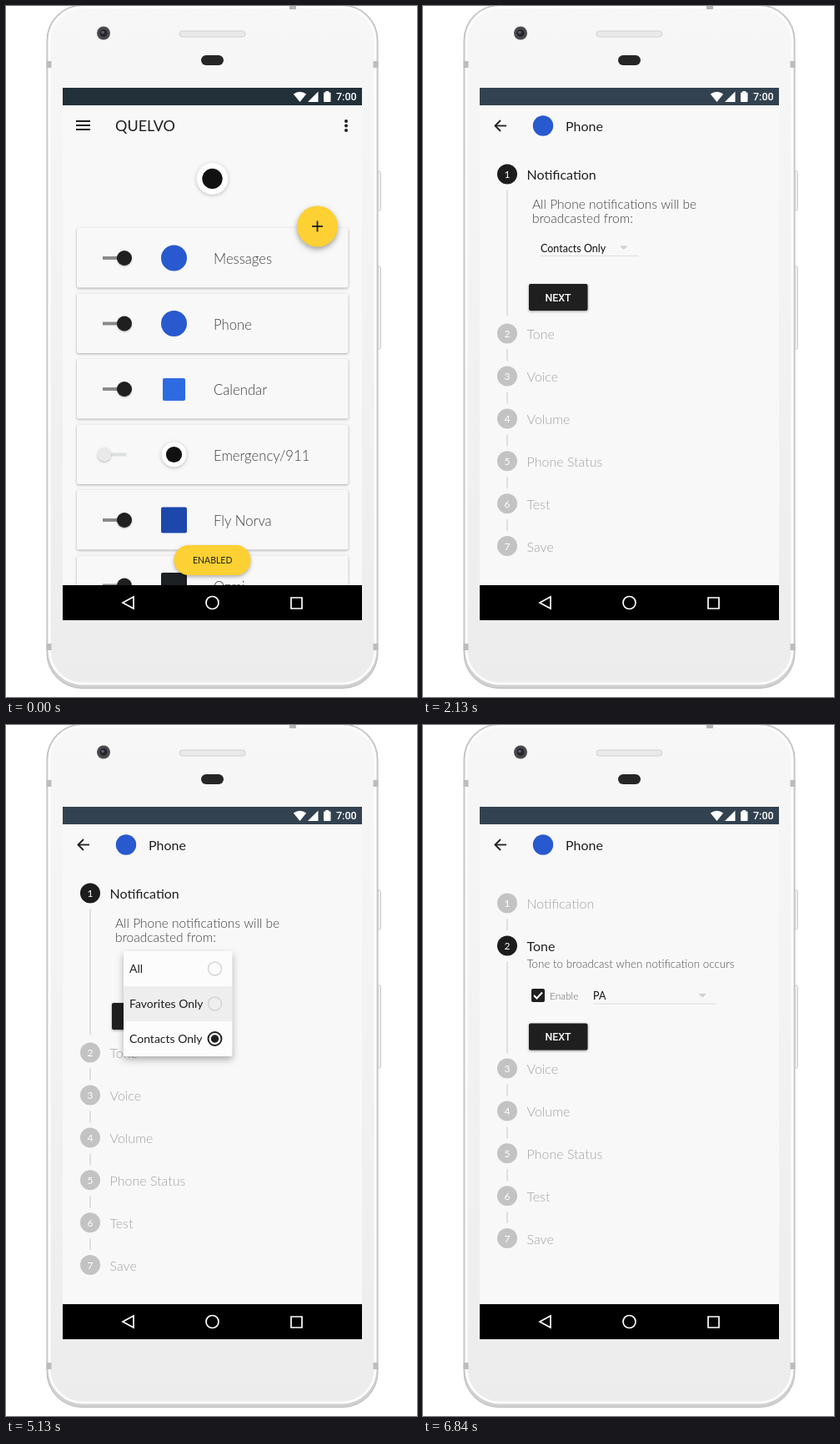
Animation, 493 px wide and 828 px high, one loop 8000 ms. Source, as an HTML page with a canvas:

```html
<!DOCTYPE html>
<html lang="en">
<head>
<meta charset="utf-8">
<title>App notification setup</title>
<style>
  html, body { margin: 0; width: 100%; height: 100%; overflow: hidden; background: #fff; }
  canvas { display: block; width: 493px; height: 828px; }
</style>
</head>
<body>
<canvas id="stage"></canvas>
<script>
const LOOP = 8000, INK = '#1f1f1f', BLUE = '#2859ce', YELLOW = '#fdd033', PAPER = '#f8f8f8';
const SOFT = '#404040', FAINT = '#a2a2a2';
const LATO = 'Lato, "Open Sans", sans-serif', ROBOTO = 'Roboto, sans-serif';
const canvas = document.getElementById('stage');
const ctx = canvas.getContext('2d');
const ratio = window.devicePixelRatio || 1;
canvas.width = 493 * ratio;
canvas.height = 828 * ratio;

const clamp = v => Math.max(0, Math.min(1, v));
const progress = (t, start, length) => clamp((t - start) / length);
const mix = (a, b, k) => a + (b - a) * k;
const easeOut = (k, power) => 1 - (1 - k) ** power;
const easeInOut = k => k * k * (3 - 2 * k);

function paint(fill, stroke, width = 1) {
  if (fill) { ctx.fillStyle = fill; ctx.fill(); }
  if (stroke) { ctx.strokeStyle = stroke; ctx.lineWidth = width; ctx.stroke(); }
}
function box(x, y, w, h, r, fill, stroke, width) {
  ctx.beginPath();
  ctx.roundRect(x, y, w, h, r);
  paint(fill, stroke, width);
}
function disc(x, y, r, fill, stroke, width) {
  ctx.beginPath();
  ctx.arc(x, y, r, 0, Math.PI * 2);
  paint(fill, stroke, width);
}
function path(points, fill, stroke, width, closed = !!fill) {
  ctx.beginPath();
  points.forEach(([x, y]) => ctx.lineTo(x, y));
  if (closed) ctx.closePath();
  paint(fill, stroke, width);
}
const line = (x1, y1, x2, y2, color, width) => path([[x1, y1], [x2, y2]], null, color, width);
function text(string, x, y, size, color, weight = 300, align = 'left', family = LATO) {
  ctx.font = `${weight} ${size}px ${family}`;
  ctx.textAlign = align;
  ctx.fillStyle = color;
  ctx.fillText(string, x, y);
}
function group(draw, alpha = 1) {
  ctx.save();
  ctx.globalAlpha *= alpha;
  draw();
  ctx.restore();
}
function clipBox(x, y, w, h) {
  ctx.beginPath();
  ctx.rect(x, y, w, h);
  ctx.clip();
}
function shadowed(blur, dy, strength, draw) {
  group(() => {
    ctx.shadowColor = `rgba(0,0,0,${strength})`;
    ctx.shadowBlur = blur * ratio;
    ctx.shadowOffsetY = dy * ratio;
    draw();
  });
}

function drawPhone() {
  for (const [y, h] of [[198, 47], [312, 99]]) box(444, y, 5.5, h, 1.5, '#efefef', '#cfcfcf');
  box(49, -1, 397, 818.5, 42, '#d0d0d0', '#bcbcbc', 1);
  const shell = ctx.createLinearGradient(0, 0, 0, 828);
  shell.addColorStop(0, '#f7f7f7');
  shell.addColorStop(1, '#ececec');
  box(52, 1.5, 391, 810.5, 40, shell, '#fdfdfd', 3);
  for (const y of [66, 764]) {
    for (const x of [48.5, 440.5]) box(x, y, 6, 8, 0, '#bdbdbd');
  }
  box(340, 0, 8, 4, 0, '#b5b5b5');
  box(208, 30, 79, 7, 3.5, '#e9e9e9', '#d0d0d0');
  disc(117, 32.5, 8, '#4a4a4c');
  disc(117, 32.5, 4.5, '#25272c');
  disc(116, 31.5, 1.8, '#5a6472');
  box(234, 59, 27, 12, 6, '#262626');
}

function drawStatusIcons() {
  ctx.beginPath();
  ctx.moveTo(352.5, 115);
  ctx.lineTo(344.8, 105.5);
  ctx.quadraticCurveTo(352.5, 100, 360.2, 105.5);
  ctx.closePath();
  paint('#fff');
  path([[362, 115], [374.5, 115], [374.5, 102.5]], '#fff');
  box(381, 103.5, 8.5, 11.5, 1, '#fff');
  box(383.2, 102, 4, 2, 0, '#fff');
  text('7:00', 396, 113, 12.5, '#fff', 500, 'left', ROBOTO);
}

function drawNavigation() {
  box(68, 694, 359, 42, 0, '#000');
  path([[153, 708], [153, 722], [140, 715]], null, '#fff', 1.7, true);
  disc(247.5, 715, 7.5, null, '#fff', 1.7);
  box(342, 709, 13, 13, 0, null, '#fff', 1.7);
}

function drawBadge(x, y, r) {
  shadowed(4, 1, .25, () => disc(x, y, r, '#fff'));
  disc(x, y, r * .64, '#111');
}

function drawSwitch(y, on) {
  if (on) {
    line(116, y, 142, y, '#8b8b8b', 4);
    shadowed(2, 1, .3, () => disc(142, y, 9, INK));
  } else {
    line(118, y, 144.5, y, '#d9e1df', 4);
    shadowed(2, 1, .25, () => disc(118, y, 8.5, '#e9e9e9'));
  }
}

const apps = [
  ['Messages', y => disc(201.5, y, 15.5, BLUE)],
  ['Phone', y => disc(201.5, y, 15.5, BLUE)],
  ['Calendar', y => box(188, y - 13, 27, 27, 2, '#2f6be0')],
  ['Emergency/911', y => drawBadge(201.5, y, 15)],
  ['Fly Norva', y => box(186, y - 15.5, 31, 31, 2, '#1d47ab')],
  ['Ozmi', y => box(186, y - 15.5, 31, 31, 2, '#1c2024')]
];

function drawTouch(t, top) {
  if (t < 1140) return;
  group(() => {
    box(85, top, 325.5, 71.5, 2);
    ctx.clip();
    box(85, top, 325.5, 71.5, 0, `rgba(0,0,0,${.05 * progress(t, 1140, 200)})`);
    disc(228, top + 36, 98 * (t - 1140) / 330, 'rgba(0,0,0,.025)');
  });
}

function drawList(t) {
  box(68, 98, 359, 596, 0, PAPER);
  box(68, 98, 359, 21, 0, '#22303a');
  for (const y of [138, 143, 148]) line(84, y, 101, y, INK, 2);
  text('QUELVO', 131, 150, 18, INK, 400);
  for (const y of [138, 143.5, 149]) disc(408, y, 2, INK);
  drawBadge(247.5, 207, 19);
  apps.forEach(([name, drawIcon], i) => {
    const top = 266 + 78.5 * i, middle = top + 36;
    shadowed(3, 1, .32, () => box(85, top, 325.5, 71.5, 2, PAPER));
    if (name === 'Phone') drawTouch(t, top);
    drawSwitch(middle, name !== 'Emergency/911');
    drawIcon(middle);
    text(name, 249, middle + 7, 16.7, SOFT);
  });
  shadowed(6, 3, .35, () => disc(373.5, 264, 24.5, YELLOW));
  line(367, 264, 380, 264, INK, 1.8);
  line(373.5, 257.5, 373.5, 270.5, INK, 1.8);
  shadowed(4, 2, .3, () => box(201.5, 646, 92, 36, 18, YELLOW));
  text('ENABLED', 247.7, 667.5, 10.5, INK, 400, 'center');
}

function drawNext(y) {
  shadowed(3, 1, .4, () => box(127, y, 70.5, 32, 2, INK));
  text('NEXT', 162, y + 20.5, 12.4, '#fff', 500, 'center', ROBOTO);
}

function drawSelect(value, x, right, underline, caret) {
  text(value, x, underline - 5, 12.5, '#111', 400);
  line(x, underline, right, underline, '#dcdcdc', 1);
  path([[caret, underline - 12], [caret + 9.5, underline - 12], [caret + 4.75, underline - 7.5]], '#cfcfcf');
}

function drawNotificationBody(dy, choice) {
  text('All Phone notifications will be', 131, 243 + dy, 15.5, SOFT);
  text('broadcasted from:', 131, 260 + dy, 15.5, SOFT);
  drawSelect(choice, 141, 258.5, 299.5 + dy, 236);
  drawNext(333 + dy);
}

function drawToneBody(y) {
  box(130, y + 51, 16, 16, 2, INK);
  path([[133, y + 59], [136.5, y + 62.5], [143, y + 55.5]], null, '#fff', 2);
  text('Enable', 152, y + 63.5, 11.9, '#606060');
  drawSelect('PA', 204, 352, y + 69, 330.5);
  drawNext(y + 92.5);
}

const stepNames = ['Notification', 'Tone', 'Voice', 'Volume', 'Phone Status', 'Test', 'Save'];

function drawSteps(t) {
  const toneActive = t >= 6630;
  const k = easeInOut(progress(t, 6630, 210));
  const layout = (before, from, to) => toneActive ? mix(from, to, k) : before;
  const first = layout(201.5, 201.5, 213.5);
  const second = layout(392.5, 401.5, 264.5);
  const third = layout(443.5, 460, 411.5);
  const firstLineEnd = layout(371, 385, 246);
  const active = toneActive ? 1 : 0;

  stepNames.forEach((name, i) => {
    const yOf = n => n === 0 ? first : n === 1 ? second : third + (n - 2) * 50.9;
    const y = yOf(i), on = i === active;
    if (i < 6) line(101, y + 19, 101, i ? yOf(i + 1) - 18 : firstLineEnd, '#dcdcdc', 1.8);
    disc(101, y, 12, on ? '#1c1c1c' : '#c3c3c3');
    text(i + 1, 101, y + 4.5, 12, '#fff', 400, 'center');
    text(name, 124.5, y + 6.5, 16, on ? INK : FAINT, on ? 400 : 300);
  });

  if (k < 1) group(() => {
    clipBox(110, first + 14, 300, second - first - 28);
    drawNotificationBody(toneActive ? 14 + first - 201.5 : 0, t < 5330 ? 'Contacts Only' : 'Favorites Only');
  }, 1 - progress(k, 0, .6));

  if (!toneActive) return;
  text('Tone to broadcast when notification occurs', 124.5, second + 26.5, 13.4, '#505050');
  group(() => {
    clipBox(110, second + 30, 300, third - second - 44);
    drawToneBody(second + .5);
  }, progress(k, .3, .7));
}

function drawMenu(t) {
  const opening = easeOut(progress(t, 3065, 385), 3);
  const closing = progress(t, 5330, 230);
  if (opening === 0 || closing === 1) return;
  group(() => {
    const top = mix(280, 271, opening), bottom = mix(300, 397, opening);
    shadowed(9, 4, .3, () => box(141, top, 130.5, bottom - top, 2, '#fcfcfc'));
    clipBox(141, top, 130.5, bottom - top);
    if (t >= 5130) {
      const shade = mix(238, 226, progress(t, 5130, 200));
      box(141, 313, 130.5, 42, 0, `rgb(${shade},${shade},${shade})`);
    }
    ['All', 'Favorites Only', 'Contacts Only'].forEach((name, i) => {
      const y = 292 + 42 * i, chosen = i === 2;
      text(name, 148, y + 5, 14, INK, 400);
      disc(250.5, y, 8, null, chosen ? INK : '#d3d3d3', chosen ? 1.9 : 1.4);
      if (chosen) disc(250.5, y, 4.7, INK);
    });
  }, opening * (1 - closing));
}

function drawScrollbar(t) {
  const isLate = t >= 6630;
  const alpha = isLate ? 1 - progress(t, 6660, 180) : t >= 5360 ? 1 - progress(t, 5500, 230) : 0;
  if (alpha) group(() => box(423.5, 193, 3.5, isLate ? 486 : 501, 0, '#ebebeb'), alpha);
}

function drawDetail(t) {
  box(68, 98, 359, 596, 0, PAPER);
  box(68, 98, 359, 21, 0, '#334250');
  line(86.5, 143.5, 100, 143.5, INK, 1.8);
  path([[93, 137], [86.5, 143.5], [93, 150]], null, INK, 1.8);
  disc(144, 143.5, 12.2, BLUE);
  text('Phone', 171, 150, 16, INK, 400);
  drawSteps(t);
  drawScrollbar(t);
  drawMenu(t);
}

function render(now) {
  const t = now % LOOP;
  ctx.setTransform(ratio, 0, 0, ratio, 0, 0);
  ctx.fillStyle = '#fff';
  ctx.fillRect(0, 0, 493, 828);
  drawPhone();
  group(() => {
    clipBox(68, 98, 359, 638);
    const enter = progress(t, 1770, 350);
    if (enter < 1) drawList(t);
    if (enter > 0) group(() => {
      ctx.translate(0, 51 * (1 - easeOut(enter, 5)));
      drawDetail(t);
    }, easeOut(progress(t, 1770, 200), 4));
    drawStatusIcons();
    drawNavigation();
  });
  requestAnimationFrame(render);
}
requestAnimationFrame(render);
</script>
</body>
</html>
```
